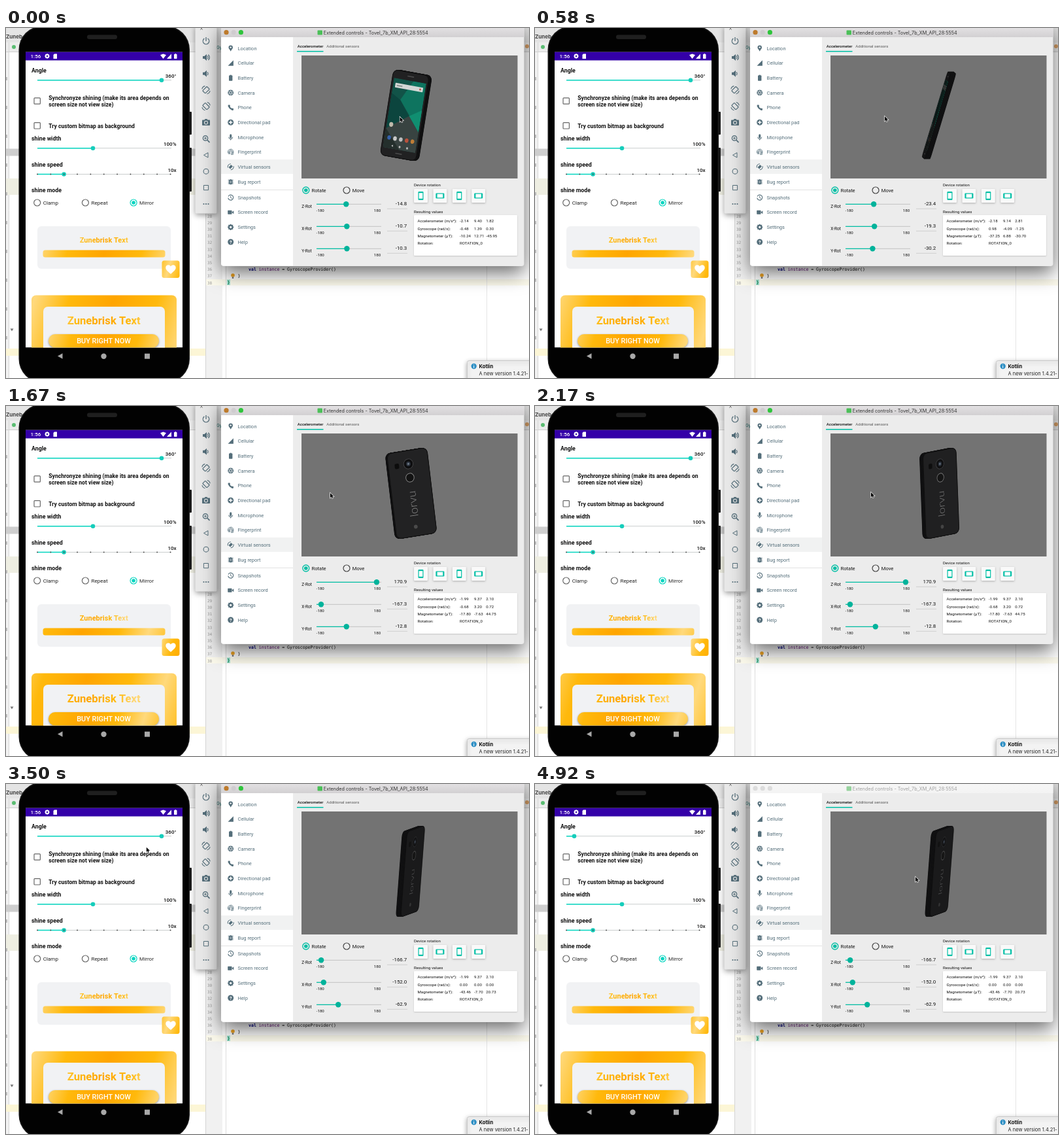
Animation, 800 px wide and 535 px high, one loop 5.01 s. Source, as an HTML page with a canvas:

```html
<!DOCTYPE html>
<html lang="en">
<head>
<meta charset="utf-8">
<title>Gyroscope shine demo</title>
<style>
  html, body { margin: 0; width: 100%; height: 100%; overflow: hidden; background: #fff; }
  canvas { display: block; width: 100vw; height: 100vh; }
</style>
</head>
<body>
<canvas id="stage" width="800" height="535"></canvas>
<script>
const ctx = document.getElementById('stage').getContext('2d');
const LOOP = 5010, FRAME = 1000 / 12;
const TEAL = '#00bfa5', MINT = '#03d5c0', SLATE = '#546e7a', INK = '#111';
const APP = 'Zunebrisk Text';

// time, yaw, lean, slope, centre x, shine centre
const POSES = [
  [0, 32, 10.5, 5, 612, .5], [580, 86, 20, 2, 618, .45], [1170, 172, -10.5, 5, 620, .3],
  [1420, 172, -10.5, 5, 620, .3], [2170, 142, -2.5, 5, 618.5, .36], [2600, 115, 5, 5, 618.5, .48]
];
// time, x, y
const POINTER = [
  [0, 602.5, 136], [580, 535, 135], [1170, 486.5, 133.5], [1420, 487, 133.5], [2170, 514, 132],
  [2600, 524.5, 132], [3000, 524.5, 132], [3750, 60, 79], [4250, 60, 79], [4670, 449, 48], [4920, 582, 142]
];
// time, rotation, accelerometer, gyroscope, magnetometer
const READINGS = [
  [0, '-14.8 -10.7 -10.3', '-2.14 9.40 1.82', '-0.48 1.39 0.30', '-10.24 12.71 -45.95'],
  [330, '-23.4 -19.3 -30.2', '-2.18 9.14 2.81', '0.98 -4.09 -1.25', '-37.25 6.88 -30.70'],
  [1500, '170.9 -167.3 -12.8', '-1.99 9.37 2.10', '-0.68 3.20 0.72', '-17.80 -7.63 44.75'],
  [2580, '-166.7 -152.0 -62.9', '-1.99 9.37 2.10', '0.00 0.00 0.00', '-43.46 -7.70 20.73']
];

function sample(keys, t) {
  const i = keys.findIndex(k => k[0] > t);
  if (i < 0) return keys[keys.length - 1].slice(1);
  const a = keys[i - 1], b = keys[i], p = (t - a[0]) / (b[0] - a[0]);
  return a.slice(1).map((v, j) => v + (b[j + 1] - v) * p);
}

function box(x, y, w, h, fill, r = 0, stroke) {
  ctx.beginPath();
  ctx.roundRect(x, y, w, h, r);
  if (fill) { ctx.fillStyle = fill; ctx.fill(); }
  if (stroke) { ctx.strokeStyle = stroke; ctx.stroke(); }
}
function arc(x, y, r, color, width, from = 0, to = 2 * Math.PI) {
  ctx.beginPath();
  ctx.arc(x, y, r, from, to);
  if (width) { ctx.lineWidth = width; ctx.strokeStyle = color; ctx.stroke(); ctx.lineWidth = 1; }
  else { ctx.fillStyle = color; ctx.fill(); }
}
function trace(pts) {
  ctx.beginPath();
  for (let i = 0; i < pts.length; i += 2) ctx.lineTo(pts[i], pts[i + 1]);
}
function poly(color, ...pts) { trace(pts); ctx.fillStyle = color; ctx.fill(); }
function line(color, width, ...pts) {
  trace(pts);
  ctx.strokeStyle = color; ctx.lineWidth = width; ctx.stroke(); ctx.lineWidth = 1;
}
function label(s, x, y, size, color = INK, { weight = 400, align = 'left', font = 'Roboto, sans-serif' } = {}) {
  ctx.font = `${weight} ${size}px ${font}`;
  ctx.textAlign = align;
  ctx.fillStyle = color;
  ctx.fillText(s, x, y);
}
function at(x, y, draw) { ctx.save(); ctx.translate(x, y); draw(); ctx.restore(); }
function shadowed(blur, color, draw) {
  ctx.save();
  ctx.shadowBlur = blur; ctx.shadowColor = color; ctx.shadowOffsetY = blur / 3;
  draw();
  ctx.restore();
}

function gear(color, hole, r) {
  for (let a = 0; a < 4; a++) {
    ctx.save();
    ctx.rotate(a * Math.PI / 4);
    box(-r * .22, -r, r * .44, r * 2, color);
    ctx.restore();
  }
  arc(0, 0, r * .78, color);
  arc(0, 0, r * .34, hole);
}
function handset(x, y, turned) {
  at(x, y, () => {
    if (turned) ctx.rotate(Math.PI / 2);
    box(-4, -6.5, 8, 13, TEAL, 1.2);
    box(-2.8, -4.3, 5.6, 8.6, '#fff');
  });
}

function drawIde() {
  const mono = { font: '"DejaVu Sans Mono", monospace' };
  box(0, 0, 800, 535, '#fff');
  box(0, 0, 800, 22, '#e4e4e4');
  box(0, 22, 800, 14, '#ececec');
  line('#cfcfcf', 1, 0, 36.5, 800, 36.5);
  label('Zuneb', 0, 16, 8, '#444', { weight: 700, font: 'Inter, sans-serif' });
  arc(12, 29, 3, '#5bbd72');
  arc(797, 28, 3, '#d9a066');
  box(0, 37, 4, 498, '#f2f2f2');
  line('#d5d5d5', 1, 4.5, 22, 4.5, 535);
  box(0, 184.5, 330, 11, '#cecece');
  box(0, 230, 305, 25, '#eeeee2');
  box(0, 490, 305, 11, '#fcf6d6');
  poly('#777', 6.5, 459.5, 11.5, 459.5, 9, 463.5);
  for (let y = 75; y < 480; y += 44) box(0, y, 2, 5, '#bbb');
  box(305, 37, 26, 498, '#f1f1f1');
  box(305, 384, 495, 9.5, '#fcfaec');
  line('#d4d4d4', 1, 305.5, 284, 305.5, 535);
  line('#dedede', 1, 336.5, 363, 336.5, 535);
  line('#e5e5e5', 1, 735.5, 363, 735.5, 535);
  label('Gy', 322, 32, 7, '#287a78');
  for (let n = 28; n <= 38; n++) label(n, 308, 287.5 + (n - 28) * 10.2 + 2, 6, '#9a9a9a', mono);
  label('}', 354.5, 381, 6.55, INK, mono);
  arc(347, 378, 2.8, '#f2a623');
  box(345.8, 380.5, 2.4, 2.5, '#777');
  box(338, 384.5, 5, 8.5, '#a5e3d5');
  label('}', 338.5, 391, 6.55, '#087a43', { ...mono, weight: 700 });
  label('val', 371, 371, 6.55, '#000080', { ...mono, weight: 700 });
  label('instance', 386.8, 371, 6.55, '#660e7a', mono);
  label('= GyroscopeProvider()', 422.2, 371, 6.55, INK, mono);
  shadowed(7, '#0005', () => box(705.5, 508.5, 110, 40, '#f3f3f3', 3, '#c9c9c9'));
  arc(715.7, 517, 4.2, '#2e8fc4');
  label('i', 715.7, 519.6, 7, '#fff', { weight: 700, align: 'center' });
  label('Kotlin', 723.5, 520, 7.7, INK, { weight: 700, font: 'Inter, sans-serif' });
  label('A new version 1.4.21-', 723.5, 530.5, 7.5, '#222', { font: 'Inter, sans-serif' });
}

function shine(x, y, w, h, c) {
  const cx = x + c * w, cy = y + h / 2, k = .3 * w;
  const g = ctx.createLinearGradient(cx - w, cy - k, cx + w, cy + k);
  const tones = ['#ffa500', '#ffb90c', '#ffd97c', '#ffb90c'];
  [0, .14, .25, .36, .5, .64, .75, .86, 1].forEach((p, i) => g.addColorStop(p, tones[i % 4]));
  return g;
}

function seek(y, thumb) {
  line('#c9cdcd', 1, 48, y, 253, y);
  line(MINT, 1.6, 48, y, thumb, y);
  arc(thumb, y, 3.3, '#16cdbb');
}

function drawHandset(c, thumb) {
  const bold = { weight: 700 }, amount = { weight: 500, align: 'right' };
  box(280, 128, 4, 35, '#1c1c1c', 1);
  box(280, 183, 4, 67, '#1c1c1c', 1);
  box(19.5, -3, 261.5, 545, '#161616', 36);
  box(21, -1.5, 258.5, 542, '#020202', 35);
  box(124, 10.5, 46, 6.5, '#1f1f1f', 3.2);
  ctx.save();
  ctx.beginPath(); ctx.rect(30, 36.5, 240, 452); ctx.clip();
  box(30, 36.5, 240, 452, '#fff');
  box(30, 36.5, 240, 13, '#3400a8');
  label('1:56', 37.5, 46, 8, '#fff', { weight: 500 });
  at(63, 43, () => gear('#fff', '#3400a8', 3.7));
  poly('#fff', 72.5, 41, 74, 39.5, 78, 39.5, 78, 47, 72.5, 47);
  poly('#fff', 236, 41.2, 240.5, 39.5, 245, 41.2, 240.5, 47);
  poly('#fff', 253, 39.5, 253, 47, 246, 47);
  box(257, 40, 4.5, 7, '#fff', .7);
  box(258.3, 39.2, 2, 1, '#fff');

  label('Angle', 39, 68, 8.8, INK, bold);
  label('360°', 260.5, 75.6, 8, INK, amount);
  seek(79.7, thumb);
  ctx.lineWidth = 1.2;
  box(43, 106.8, 9.4, 9.4, null, 1, '#666');
  box(43, 144.6, 9.4, 9.4, null, 1, '#666');
  ctx.lineWidth = 1;
  label('Synchronyze shining (make its area depends on', 65.3, 109.8, 8.6, INK, bold);
  label('screen size not view size)', 65.3, 120.1, 8.6, INK, bold);
  label('Try custom bitmap as background', 65.3, 152.5, 8.6, INK, bold);
  label('shine width', 39, 172, 8.8, INK, bold);
  label('100%', 260.5, 179.8, 8, INK, amount);
  seek(183.7, 133);
  label('shine speed', 39, 212, 8.8, INK, bold);
  label('10x', 260.5, 219.8, 8, INK, amount);
  seek(223.5, 88.6);
  for (let i = 0; i <= 10; i++) arc(48 + i * 20.35, 223.5, .9, '#444');
  label('shine mode', 39, 251, 8.8, INK, bold);
  ['Clamp', 'Repeat', 'Mirror'].forEach((s, i) => {
    const x = 47.7 + i * 73.7, on = i === 2;
    arc(x, 267, 5, on ? MINT : '#666', 1.2);
    if (on) arc(x, 267, 2.8, MINT);
    label(s, x + 9, 270, 8.1, '#222');
  });

  box(48, 303, 204, 65, '#f1f2f4', 6);
  label(APP, 149.7, 328, 11, shine(105, 318, 90, 12, c), { weight: 700, align: 'center' });
  box(56.5, 339.5, 187, 11, shine(56.5, 339.5, 187, 11, c), 3.5);
  // the small button shows only the middle of a wider, shifted shine
  box(238.5, 355.5, 27, 26.5, shine(211.5, 355.5, 81, 26.5, c + .5), 3.5);
  at(252, 369, () => {
    ctx.beginPath();
    ctx.moveTo(0, 7);
    ctx.bezierCurveTo(-5, 2.5, -7.7, .5, -7.7, -2.8);
    ctx.bezierCurveTo(-7.7, -7, -2.2, -8.2, 0, -4.6);
    ctx.bezierCurveTo(2.2, -8.2, 7.7, -7, 7.7, -2.8);
    ctx.bezierCurveTo(7.7, .5, 5, 2.5, 0, 7);
    ctx.fillStyle = '#fff'; ctx.fill();
  });
  box(39, 408.5, 222, 110, shine(39, 408.5, 222, 110, c), 7);
  box(57, 426, 186, 90, '#f1f2f4', 7);
  label(APP, 149.7, 453, 16.7, shine(82, 438, 136, 18, c), { weight: 700, align: 'center' });
  shadowed(3, '#0006', () => box(65, 468, 169, 20.5, shine(65, 468, 169, 20.5, c), 10));
  label('BUY RIGHT NOW', 149.5, 482, 10.95, '#fff', { weight: 500, align: 'center' });
  ctx.restore();

  poly('#a8a8a8', 79, 501.5, 86.5, 497.3, 86.5, 505.8);
  arc(149.5, 501.7, 4.2, '#a8a8a8');
  box(212, 497.7, 8, 8, '#a8a8a8');
}

function speaker(waves) {
  poly(SLATE, -5, -2, -2.5, -2, 1, -5, 1, 5, -2.5, 2, -5, 2);
  for (let i = 0; i < waves; i++) arc(0, 0, 3 + i * 2.3, SLATE, 1.2, -.9, .9);
}
function tilted(sign) {
  ctx.scale(-sign, 1);
  ctx.rotate(-Math.PI / 4);
  ctx.lineWidth = 1.2;
  box(-2.9, -4.6, 5.8, 9.2, null, .8, SLATE);
  ctx.rotate(Math.PI / 4);
  arc(0, 0, 6.3, SLATE, 1.1, -1.3, -.2);
  arc(0, 0, 6.3, SLATE, 1.1, 1.8, 2.9);
}
const TOOLS = [
  () => { arc(0, 0, 4.7, SLATE, 1.3, -1, 4.1); line(SLATE, 1.3, 0, -6, 0, 0); },
  () => speaker(2), () => speaker(1), () => tilted(1), () => tilted(-1),
  () => { box(-6, -4, 12, 8.6, SLATE, 1); box(-2, -5.4, 4, 2, SLATE); arc(0, .3, 2.5, '#e8e8e8', 1.1); },
  () => {
    arc(-1, -1, 3.7, SLATE, 1.2);
    line(SLATE, 1.5, 2, 2, 5.5, 5.5);
    line(SLATE, 1, -3, -1, 1, -1);
    line(SLATE, 1, -1, -3, -1, 1);
  },
  () => { trace([-3.5, 0, 3, -3.7, 3, 3.7]); ctx.closePath(); ctx.strokeStyle = SLATE; ctx.stroke(); },
  () => arc(0, 0, 3.9, SLATE, 1.1),
  () => box(-3.6, -3.6, 7.2, 7.2, null, 0, SLATE),
  () => [-3.5, 0, 3.5].forEach(x => arc(x, 0, 1.1, SLATE))
];
function drawToolbar() {
  shadowed(8, '#0006', () => box(289.5, -4, 33, 287.5, '#e8e8e8', 2));
  line('#8a8a8a', 1, 297, -1, 301, 3);
  line('#8a8a8a', 1, 301, -1, 297, 3);
  TOOLS.forEach((icon, i) => at(306, 20 + i * 24.9, icon));
}

const MENU = [
  ['Location', () => { arc(0, -1.4, 3.2, SLATE); poly(SLATE, -2.9, -.2, 2.9, -.2, 0, 4.7); arc(0, -1.4, 1.2, '#fff'); }],
  ['Cellular', () => poly(SLATE, -4.2, 4, 4.2, 4, 4.2, -4.4)],
  ['Battery', () => { box(-2.7, -3.7, 5.4, 8.2, SLATE, .7); box(-1.2, -4.6, 2.4, 1.2, SLATE); }],
  ['Camera', () => {
    arc(0, 0, 4.4, SLATE);
    for (let a = 0; a < 6; a++) { ctx.rotate(Math.PI / 3); line('#fff', .6, -1, -1.7, 3.7, -1.7); }
  }],
  ['Phone', () => { arc(4.3, -4.3, 7.2, SLATE, 2.3, 1.7, 3); box(-4, -4.2, 3, 3, SLATE, .6); box(1.2, 1.2, 3, 3, SLATE, .6); }],
  ['Directional pad', () => { arc(0, 0, 4.5, SLATE); line('#fff', 1.5, -2.8, 0, 2.8, 0); line('#fff', 1.5, 0, -2.8, 0, 2.8); }],
  ['Microphone', () => { box(-1.5, -4.7, 3, 6.2, SLATE, 1.5); arc(0, -.2, 3, SLATE, 1, 0, Math.PI); line(SLATE, 1, 0, 2.8, 0, 4.7); }],
  ['Fingerprint', () => [1.3, 2.7, 4.1].forEach(r => {
    arc(0, -.2, r, SLATE, .8, 2.8, 6.6);
    line(SLATE, .8, r, 0, r * .8, 4.5);
    line(SLATE, .8, -r, 0, -r * .8, 3.2);
  })],
  ['Virtual sensors', () => {
    ctx.rotate(.75);
    box(-1.8, -2.8, 3.6, 5.6, SLATE, .7);
    arc(0, 0, 4.5, SLATE, 1, -1, .8);
    arc(0, 0, 4.5, SLATE, 1, 2.1, 4);
  }],
  ['Bug report', () => {
    [-2.2, .5, 3].forEach(y => line(SLATE, 1, -4, y, 4, y));
    box(-2.6, -3.6, 5.2, 8, SLATE, 2.5);
    line('#fff', .7, -1.2, -.5, 1.2, -.5);
    line('#fff', .7, -1.2, 1.5, 1.2, 1.5);
  }],
  ['Snapshots', () => { arc(0, 0, 4, SLATE, 1.1, -2.7, 3); line(SLATE, 1, 0, -2.4, 0, .3, 2, 1.4); }],
  ['Screen record', () => { box(-4.5, -3, 6.3, 6, SLATE, .8); poly(SLATE, 1.5, 0, 4.6, -2.6, 4.6, 2.6); }],
  ['Settings', () => gear(SLATE, '#fff', 4.6)],
  ['Help', () => { arc(0, 0, 4.5, SLATE); label('?', 0, 2.6, 7.3, '#fff', { weight: 700, align: 'center' }); }]
];

function drawWindow(active) {
  shadowed(30, '#0009', () => box(329, -6, 463.5, 370, '#ececec', 4));
  const bar = ctx.createLinearGradient(0, 0, 0, 14);
  bar.addColorStop(0, active ? '#e2e0e2' : '#f6f6f6');
  bar.addColorStop(1, active ? '#d2d0d2' : '#f3f3f3');
  box(329, 0, 463.5, 14, bar);
  const lights = active ? ['#bd7b2c', '#cfcccf', '#2fc43c'] : ['#dcdcdc', '#dcdcdc', '#dcdcdc'];
  lights.forEach((c, i) => arc(337 + i * 11.2, 6.7, 3.6, c));
  box(476.5, 3.5, 7.5, 7, active ? '#4bbf58' : '#96d29d', 1);
  label('Extended controls - Tovel_7b_XM_API_28:5554', 565.7, 9.6, 7.2, active ? '#333' : '#a0a0a0',
    { align: 'center', font: 'Inter, sans-serif' });
  box(329, 14, 110, 349.5, '#fff', [0, 0, 0, 4]);
  box(329, 201, 110, 22, '#f1f2f2');
  line('#e2e2e2', 1, 329, 247.5, 439, 247.5);
  MENU.forEach(([name, icon], i) => {
    const y = 31 + i * 22.65 + (i > 9 ? 1.6 : 0);
    at(343.7, y, icon);
    label(name, 354.5, y + 2.7, 7.5, SLATE);
  });
  label('Accelerometer', 445.7, 30.3, 6.05, INK, { weight: 500 });
  label('Additional sensors', 490.3, 30.3, 6.05, '#555');
  box(445, 35, 40.5, 1.5, TEAL);
  box(452, 42, 330.5, 188, '#737373');

  arc(458.8, 248, 5, TEAL, 1.3);
  arc(458.8, 248, 2.8, TEAL);
  label('Rotate', 467.5, 251, 7.6);
  arc(521, 248, 5, '#444', 1.2);
  label('Move', 529.8, 251, 7.6);
  label('Device rotation', 624, 242, 6.13);
  for (let i = 0; i < 4; i++) {
    const x = 624 + i * 29.4;
    shadowed(3, '#0004', () => box(x, 246, 21, 21, '#f9f9f9', 1));
    handset(x + 10.5, 256.5, i % 2);
  }
  label('Resulting values', 624, 283, 6.13);
  shadowed(2, '#0003', () => box(624, 286, 158, 62, '#fff', 1));
}

function drawReadings(t) {
  const [, rotation, ...sensors] = READINGS.filter(r => r[0] <= t).pop();
  rotation.split(' ').forEach((v, i) => {
    const y = 269.3 + i * 34, x = 524 + .2513 * v;
    label('ZXY'[i] + '-Rot', 452.3, y + 6, 6.5);
    line('#c2c2c2', 1, 475, y, 574, y);
    line(TEAL, 1.3, 475, y, x, y);
    arc(x, y, 4.2, '#00b39b');
    label('-180', 474.7, y + 11.6, 6.2);
    label('180', 573.3, y + 11.6, 6.2, INK, { align: 'right' });
    label(v, 613.3, y + 1.7, 7.9, INK, { align: 'right' });
    line('#cfcfcf', 1, 583, y + 7, 614, y + 7);
  });
  ['Accelerometer (m/s²):', 'Gyroscope (rad/s):', 'Magnetometer (µT):', 'Rotation:'].forEach((s, i) => {
    const y = 297.3 + i * 11.2;
    label(s, 629.5, y, 6.1);
    (sensors[i] || 'ROTATION_0').split(' ').forEach((v, j) => label(v, [694, 716, 734.3][j], y, 6.1));
  });
}

function drawFront(facing) {
  ctx.save();
  ctx.beginPath(); ctx.rect(-29, -53, 58, 106); ctx.clip();
  box(-29, -53, 58, 106, '#14594d');
  poly('#0f7d66', 29, -53, 29, 20, -12, -22, 6, -53);
  poly('#0d4a42', -29, -30, -12, -22, 8, 0, -29, 24);
  poly('#119a79', 29, -12, 29, 22, 8, 0);
  poly('#3d4845', -29, 24, 8, 0, 29, 22, 29, 53, -29, 53);
  poly('#27322f', -29, 24, 0, 53, -29, 53);
  box(-25, -46, 50, 7, '#e4e8e6', 1);
  box(-22, -43.4, 10, 2, '#9aa3a0');
  arc(20, -42.5, 1.5, '#d24a3a');
  arc(-21, 17, 3.6, '#cfc8b8');
  ['#3a68b8', '#d8d8d8', '#cccccc', '#c9573f', '#d0873a'].forEach((c, i) => arc(-21 + i * 10.5, 37, 3.3, c));
  poly('#ccc', -15, 48.5, -12, 46.8, -12, 50.2);
  arc(0, 48.5, 1.7, '#ccc');
  box(12, 47, 3, 3, '#ccc');
  ctx.globalAlpha = .9 * (1 - facing) ** 1.3;
  box(-29, -53, 58, 106, '#0b0d0d');
  ctx.restore();
  box(-6, -60, 12, 1.6, '#4a4a4a', .8);
  box(-6, 58, 12, 1.6, '#4a4a4a', .8);
}
function drawBack(facing) {
  ctx.globalAlpha = .2 + .8 * facing;
  box(-22, -48, 7, 8, '#0b0b0b', 2);
  arc(0, -45, 8, '#0d0d0e');
  arc(0, -45, 7.6, '#48484a', 1);
  arc(0, -45, 3.5, '#303844');
  arc(0, -45, 1.4, '#7d8794');
  arc(0, -24, 6.6, '#131313');
  arc(0, -24, 6.6, '#8b8b8b', 1);
  arc(0, 51, 3, '#4c4c4c');
  ctx.rotate(-Math.PI / 2);
  label('lorvu', -16, 6, 18, '#8a8a8a', { weight: 300, align: 'center', font: 'Lato, sans-serif' });
}

function drawModel([yaw, lean, slope, cx]) {
  const a = yaw * Math.PI / 180, cos = Math.cos(a), front = cos > 0, facing = Math.abs(cos);
  const shade = Math.round(20 + 15 * facing);
  const side = front ? 1 : -1;
  for (let i = 0; i <= 14; i++) {
    const depth = side * (-1 + i / 7) * 4.2;
    ctx.save();
    ctx.transform(side * cos, side * slope / 33, -lean / 66, 1, cx - Math.sin(a) * depth, 133.5);
    const tone = i === 14 ? shade : 17;
    box(-32.5, -65.5, 65, 131, `rgb(${tone},${tone},${tone + 1})`, 8);
    if (i === 14) {
      ctx.lineWidth = .8;
      box(-32.1, -65.1, 64.2, 130.2, null, 8, '#0b0b0b');
      front ? drawFront(facing) : drawBack(facing);
    }
    ctx.restore();
  }
}

function drawPointer([x, y]) {
  at(x, y, () => {
    ctx.scale(.9, .9);
    trace([0, 0, 0, 8.2, 1.9, 6.5, 3.1, 9.2, 4.5, 8.6, 3.3, 6, 5.8, 5.8]);
    ctx.closePath();
    ctx.strokeStyle = '#fff'; ctx.lineWidth = 1.4; ctx.stroke();
    ctx.fillStyle = '#000'; ctx.fill();
  });
}

function draw(t) {
  const pose = sample(POSES, t);
  ctx.lineWidth = 1;
  drawIde();
  drawHandset(pose[4], t < 4050 ? 238 : 60);
  drawToolbar();
  drawWindow(t < 3880);
  drawReadings(t);
  drawModel(pose);
  drawPointer(sample(POINTER, t));
}

let shown = -1;
function tick() {
  const t = Math.floor(performance.now() % LOOP / 10) * 10;
  const step = Math.min(59, Math.floor((t + 5) / FRAME));
  if (step !== shown) {
    shown = step;
    draw(Math.round(step * FRAME / 10) * 10);
  }
  requestAnimationFrame(tick);
}
tick();
</script>
</body>
</html>
```
